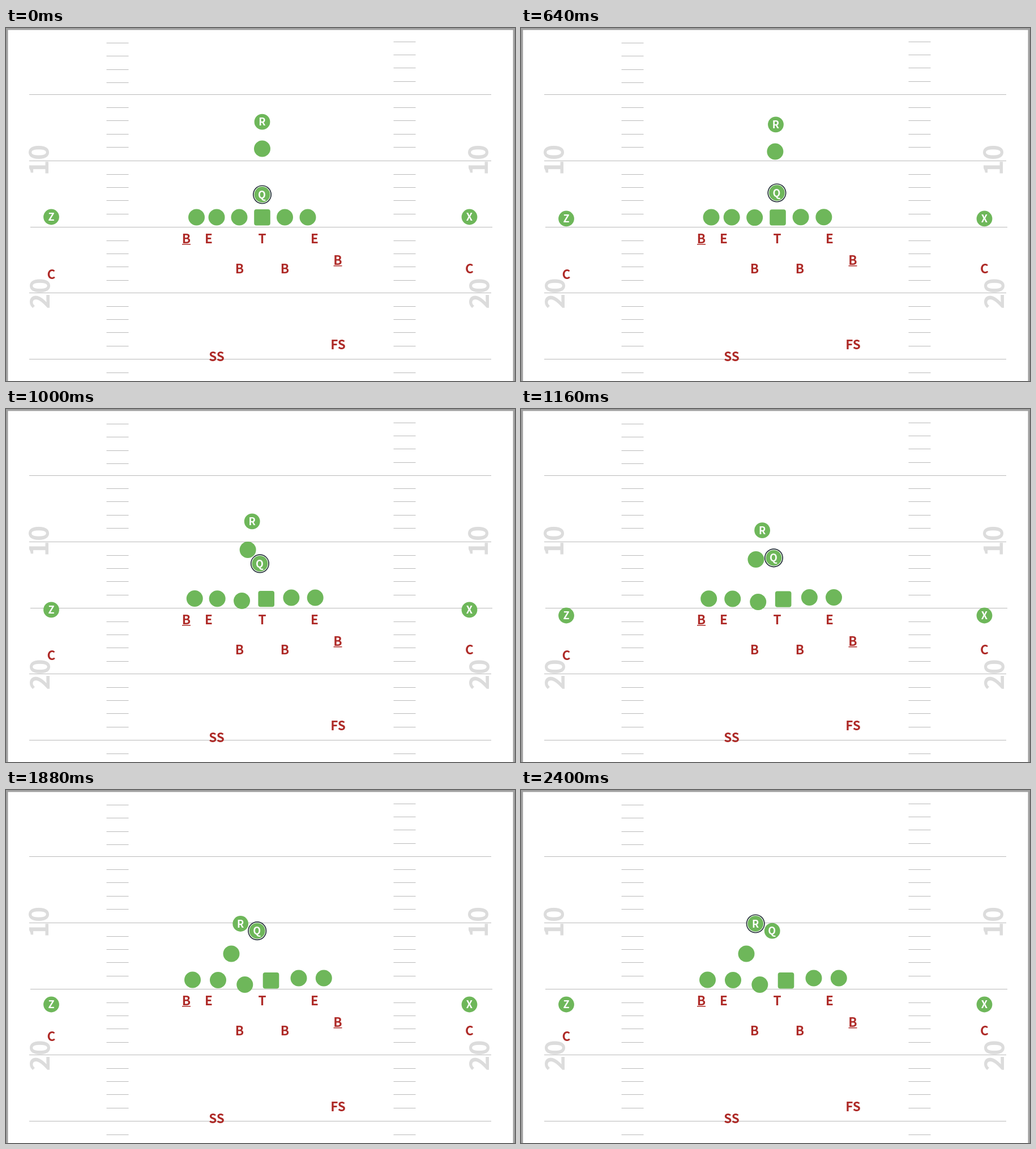
Animation, 899 px wide and 623 px high, one loop 2440 ms. Source, as an HTML page with a canvas:

```html
<!DOCTYPE html>
<html lang="en">
<head>
<meta charset="utf-8">
<style>
html, body { margin: 0; width: 100%; height: 100%; overflow: hidden; background: #fff; }
canvas { display: block; }
</style>
</head>
<body>
<canvas width="899" height="623"></canvas>
<script>
const ctx = document.querySelector('canvas').getContext('2d');
const FONT = '"Noto Sans CJK JP", "Noto Sans CJK SC", "Noto Sans CJK", "Noto Sans", sans-serif';
const GREEN = '#6eb75a', RED = '#ae2a27';
const LOOP = 2440, STEP = 40, START = 424, MOVE = 1200, HANDOFF = 2320;

// label, start x, y, end x, y
const offense = [
  ['', 336.5, 334, 329.5, 335],
  ['', 372, 334, 374.5, 335.5],
  ['', 412, 334, 421.8, 343.5],
  ['square', 452.5, 334, 468, 336],
  ['', 492.5, 334, 517, 332],
  ['', 533, 334, 561.3, 332],
  ['', 452.5, 213, 398, 289],
  ['Z', 80, 333.5, 80, 378.5],
  ['X', 818.5, 333.5, 818.5, 378.5],
  ['R', 452.5, 165.7, 414.2, 236],
  ['Q', 452.5, 294, 443.7, 248.7]
];
const defense = [
  ['B', 318.5, 371, true], ['E', 358, 371], ['T', 452.5, 371], ['E', 545, 371],
  ['B', 412.5, 424.5], ['B', 492.5, 424.5], ['B', 586, 409, true],
  ['C', 80, 434.5], ['C', 818.5, 424.5], ['FS', 586.5, 558], ['SS', 372, 579]
];
const yardLines = [[41, 117], [41, 233.5], [43, 351], [41, 466.5], [41, 584]];
const hashGroups = [140, 257.5, 374.5, 490.5];

// cubic-bezier(.42, 0, .58, 1)
function easeInOut(x) {
  if (x <= 0 || x >= 1) return x <= 0 ? 0 : 1;
  let lo = 0, hi = 1, t = 0.5;
  for (let i = 0; i < 24; i++) {
    const u = 1 - t;
    if (1.26 * u * u * t + 1.74 * u * t * t + t ** 3 < x) lo = t; else hi = t;
    t = (lo + hi) / 2;
  }
  return t * t * (3 - 2 * t);
}

function text(str, x, baseline, size, color) {
  ctx.font = `bold ${size}px ${FONT}`;
  ctx.fillStyle = color;
  ctx.fillText(str, x, baseline);
}

function line(x, y, width) {
  ctx.fillStyle = '#bababa';
  ctx.fillRect(x, Math.round(y), width, 1);
}

function disc(x, y, r, color) {
  ctx.fillStyle = color;
  ctx.beginPath();
  ctx.arc(x, y, r, 0, Math.PI * 2);
  ctx.fill();
}

function yardNumber(str, x, y) {
  ctx.save();
  ctx.translate(x, y);
  ctx.rotate(-Math.PI / 2);
  text(str, 0, 16, 46, '#dcdcdc');
  ctx.restore();
}

function drawField() {
  ctx.fillStyle = '#a0a0a0';
  ctx.fillRect(0, 0, 899, 623);
  ctx.fillStyle = '#fff';
  ctx.fillRect(3.5, 3.5, 892, 620);
  for (const [x, y] of yardLines) line(x, y, 816);
  for (const [x, top] of [[177.5, 26], [684.5, 23.5]]) {
    for (let i = 0; i < 4; i++) {
      line(x, top + i * 23.4, 39);
      for (const y of hashGroups) line(x, y + i * 23.4, 39);
    }
    line(x, 608, 39);
  }
  yardNumber('10', 59, 233);
  yardNumber('10', 835, 233);
  yardNumber('20', 61, 468.5);
  yardNumber('20', 837, 468.5);
}

function drawDefender([label, x, y, underlined]) {
  text(label, x, y + 8.5, 22.5, RED);
  if (underlined) ctx.fillRect(x - 7.5, y + 10, 15, 1.5);
}

function drawPlayer([label, x0, y0, x1, y1], p, carrier) {
  const x = x0 + (x1 - x0) * p, y = y0 + (y1 - y0) * p;
  if (label === 'square') {
    ctx.fillStyle = GREEN;
    ctx.beginPath();
    ctx.roundRect(x - 14.3, y - 14, 28.6, 28.4, 4);
    ctx.fill();
    return;
  }
  if (label && label === carrier) {
    disc(x, y, 16.6, '#26323a');
    disc(x, y, 14.9, '#fff');
  }
  disc(x, y, label ? 13.9 : 14.5, GREEN);
  if (label) text(label, x - (label === 'Q' ? 0.5 : 0), y + 6.7, 18, '#fff');
}

function draw(now) {
  const time = Math.floor(now % LOOP / STEP) * STEP;
  const p = easeInOut((time - START) / MOVE);
  const carrier = time < HANDOFF ? 'Q' : 'R';
  ctx.textAlign = 'center';
  drawField();
  defense.forEach(drawDefender);
  offense.forEach(player => drawPlayer(player, p, carrier));
}

const begin = performance.now();
function tick() {
  draw(performance.now() - begin);
  requestAnimationFrame(tick);
}
tick();
</script>
</body>
</html>
```
